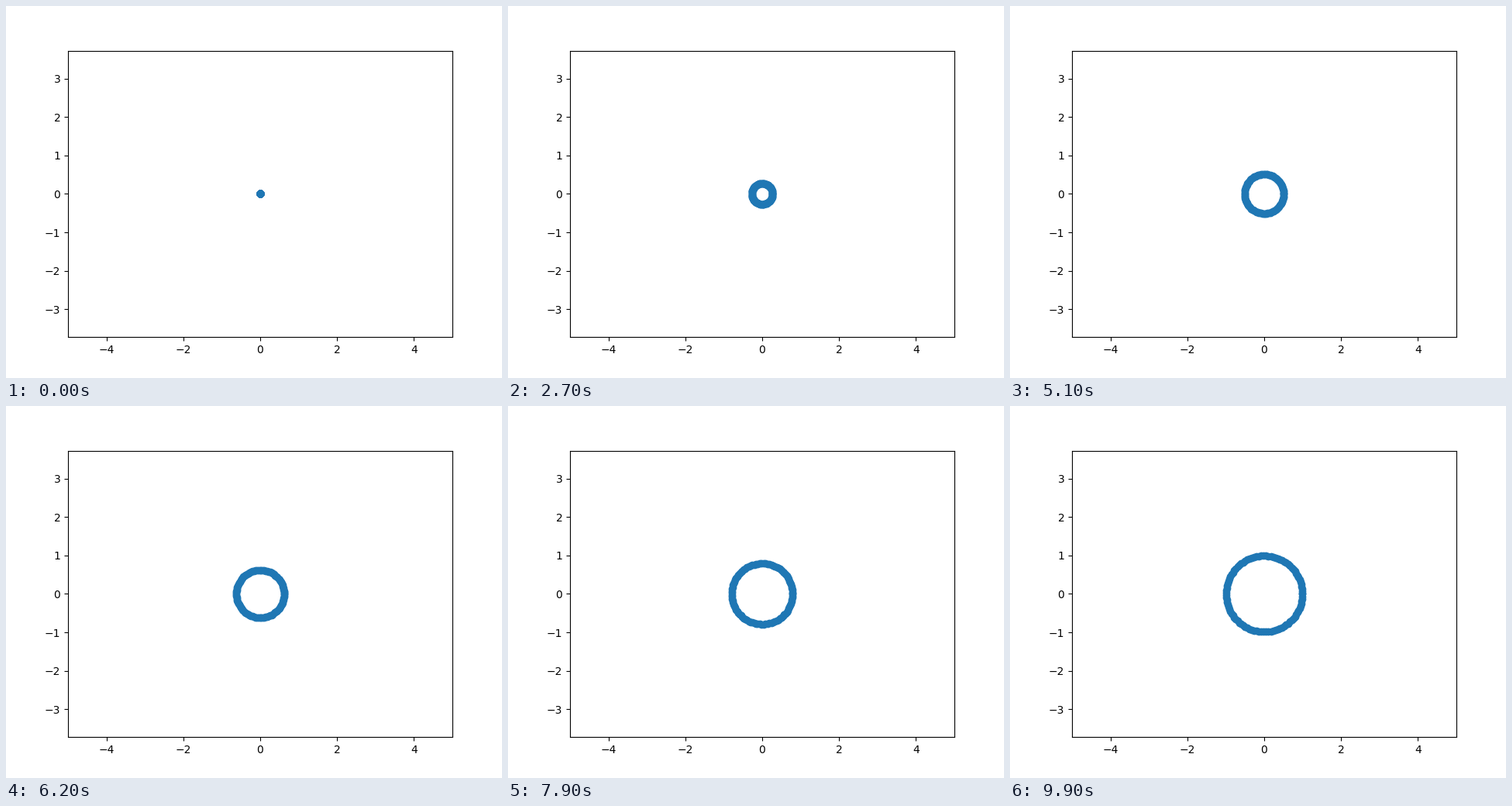
These frames come from a looping animation (640 by 480 pixels, 10 s). A matplotlib script:

```python
import matplotlib.pyplot as plt
import numpy as np
from matplotlib.animation import FuncAnimation

FRAMES = 100
INTERVAL = 100  # ms
HALF_WIDTH = 5

fig, ax = plt.subplots(figsize=(6.4, 4.8), dpi=100)

# Same scale on both axes inside the default axes box
box = ax.get_position()
half_height = HALF_WIDTH * (box.height * 4.8) / (box.width * 6.4)
ax.set_xlim(-HALF_WIDTH, HALF_WIDTH)
ax.set_ylim(-half_height, half_height)
ax.set_xticks(range(-4, 5, 2))
ax.set_yticks(range(-3, 4))

theta = np.linspace(0, 2 * np.pi, 100)
ring, = ax.plot([], [], "o", color="C0")


def update(i):
    radius = i / FRAMES
    ring.set_data(radius * np.cos(theta), radius * np.sin(theta))
    return ring,


anim = FuncAnimation(fig, update, frames=FRAMES, interval=INTERVAL,
                     repeat=True, repeat_delay=0)
plt.show()
```
